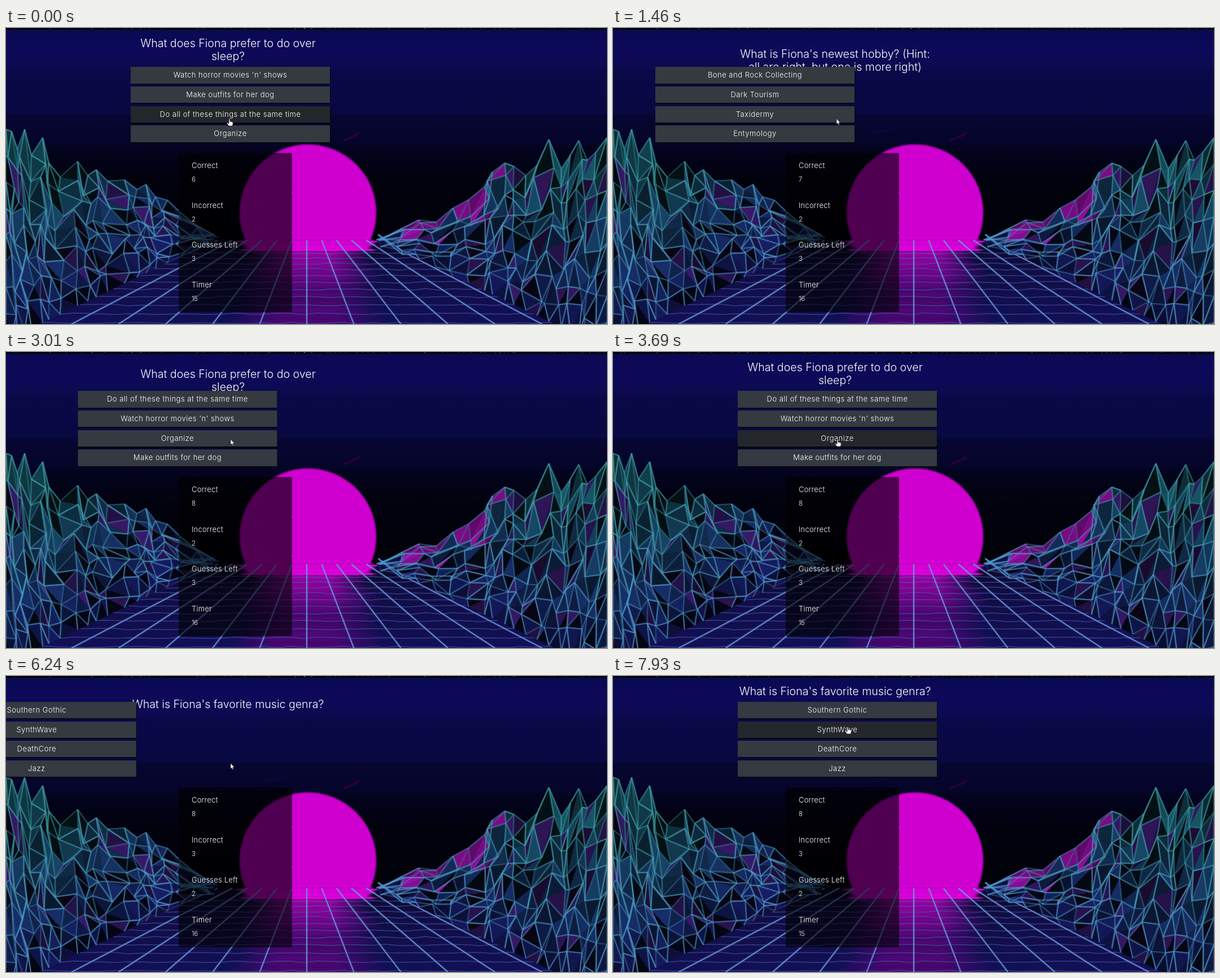
These frames come from a looping animation (1065 by 526 pixels, 8 s). An HTML page with a canvas:

```html
<!DOCTYPE html>
<html lang="en">
<head>
<meta charset="utf-8">
<title>Quiz</title>
<style>
  html, body { margin: 0; width: 100%; height: 100%; overflow: hidden; background: #000; }
  body { position: relative; color: #fff; font: 300 13px Inter, "Open Sans", sans-serif; white-space: nowrap; }
  canvas, #title, #options, #panel, svg { position: absolute; left: 0; top: 0; }
  #title { left: 193.5px; top: 15.5px; width: 400px; text-align: center; font-size: 19.6px; line-height: 23.5px; }
  #options { left: 221px; width: 353px; }
  #options div {
    position: absolute; width: 100%; height: 29.3px; line-height: 29.3px; text-align: center;
    letter-spacing: .5px; background: #343a40; box-shadow: 1px 1.5px 0 #05060a;
  }
  #options div.hover { background: #23272b; }
  #panel { left: 306px; width: 201px; }
  #panel div { height: 70.9px; position: relative; background: rgba(0, 0, 0, .61); border-radius: 3px; }
  #panel b, #panel span { position: absolute; left: 23px; line-height: 20px; letter-spacing: .2px; }
  #panel b { top: 12px; font-weight: 300; }
  #panel span { top: 37px; font-size: 11.5px; letter-spacing: -.3px; }
  svg { overflow: visible; width: 12px; height: 16px; }
</style>
</head>
<body>
<canvas id="view" width="1065" height="526"></canvas>
<div id="title"></div>
<div id="options"><div></div><div></div><div></div><div></div></div>
<div id="panel">
  <div><b>Correct</b><span></span></div>
  <div><b>Incorrect</b><span></span></div>
  <div><b>Guesses Left</b><span></span></div>
  <div><b>Timer</b><span></span></div>
</div>
<svg id="pointer" fill="#fff" stroke="#111" stroke-width=".7" stroke-linejoin="round">
  <path id="arrow" d="M0 0V10L2.2 8L3.8 11.5L5.3 10.8L3.8 7.4H6.8Z"/>
  <path id="hand" d="M-1 1Q0-.6 1 1V5L5 6Q6.4 6.4 6.3 8L5.4 13H-1.2L-4.5 8.6Q-4.6 6.8-3 7.4L-1 9Z"/>
</svg>
<script>
const $ = id => document.getElementById(id);

// ---------- scenery ----------
const g = $('view').getContext('2d');
let seed = 11;
const rnd = () => (seed = (seed * 16807) % 2147483647) / 2147483647;
const rgb = (c, k = 1, a = 1) => `rgba(${c.map(v => Math.round(v * k))},${a})`;
const mix = (a, b, k) => a.map((v, i) => v + (b[i] - v) * k);

function gradient(x1, y1, x2, y2, stops) {
  const fill = g.createLinearGradient(x1, y1, x2, y2);
  stops.forEach(([at, color]) => fill.addColorStop(at, color));
  return fill;
}

function line(points, color, width) {
  g.beginPath();
  points.forEach(([x, y]) => g.lineTo(x, y));
  g.strokeStyle = color;
  g.lineWidth = width;
  g.stroke();
}

function sky() {
  g.fillStyle = gradient(0, 0, 0, 378, [[0, '#090952'], [.1, '#0d0a5a'], [.19, '#0c0a50'], [.2, '#0a0948'],
    [.4, '#080842'], [.41, '#060632'], [.54, '#05052a'], [.56, '#03031f'], [.7, '#02020f'], [1, '#010108']]);
  g.fillRect(0, 0, 1065, 378);
  line([[598, 200], [612, 194], [627, 186]], 'rgba(70,0,60,.5)', 4);
  line([[460, 187], [492, 180]], 'rgba(50,0,70,.3)', 4);
}

function sun() {
  g.save();
  g.beginPath();
  g.rect(0, 0, 1065, 378);
  g.clip();
  g.beginPath();
  g.arc(535, 328, 121, 0, 7);
  g.fillStyle = '#cf00cf';
  g.strokeStyle = 'rgba(120,0,130,.6)';
  g.lineWidth = 3;
  g.fill();
  g.stroke();
  g.restore();
}

function ground() {
  g.fillStyle = gradient(0, 376, 0, 526, [[0, '#0b0722'], [.3, '#110d42'], [1, '#121055']]);
  g.fillRect(0, 376, 1065, 150);
  for (let y = 372; y < 526; y += 3) {
    const k = (y - 372) / 154;
    const half = (k < .17 ? 122 : 105 + 30 * k) + 24 * (rnd() - .5);
    const c = k < .15 ? [232, 0, 232] : mix([195, 0, 200], [88, 6, 125], Math.min(1, (k - .15) * 2.2));
    const edge = rgb(c, 1, 0), core = rgb(c, .85 + .15 * rnd(), k < .15 ? 1 : .85);
    g.fillStyle = gradient(535 - half, 0, 535 + half, 0,
      [[0, edge], [k < .15 ? .05 : .32, core], [k < .15 ? .95 : .68, core], [1, edge]]);
    g.fillRect(535 - half, y, 2 * half, 3);
  }
  for (let y = 400, step = 9; y < 526; y += step, step *= 1.07) {
    const row = [];
    for (let x = 0; x <= 1065; x += 24) row.push([x, y + 3 * (rnd() - .5)]);
    line(row, 'rgba(72,92,180,.6)', 1.5);
  }
  for (let k = -14; k <= 14; k++) {
    const at = y => [533 + k * 26 * (y - 308) / 68, y];
    line([at(377), at(526)], 'rgba(90,120,205,.3)', 4);
    line([at(377), at(526)], 'rgba(115,160,220,.85)', 1.7);
  }
}

// Wireframe slope hanging from a ridge; the ridge runs from the screen edge to the middle.
function mountains(ridge, pink) {
  const rows = 8, inner = ridge[ridge.length - 1][0];
  const mesh = ridge.map(([x, top]) => {
    const base = 378 + .48 * Math.abs(inner - x);
    return Array.from({ length: rows + 1 }, (_, j) => {
      const k = j / rows, loose = j && j < rows && x > 0 && x < 1065 ? 1 : 0;
      return [x + loose * 20 * (rnd() - .5), top + (base - top) * k + loose * 24 * (rnd() - .5)];
    });
  });
  const edges = [];
  for (let i = 0; i + 1 < mesh.length; i++) for (let j = 0; j < rows; j++) {
    const [a, b, c, d] = [mesh[i][j], mesh[i + 1][j], mesh[i + 1][j + 1], mesh[i][j + 1]];
    const far = Math.abs(inner - a[0]) / 380, teal = Math.min(1, far * 1.3) * (1 - j / rows);
    for (const tri of [[a, b, c], [a, c, d]]) {
      let color = mix([21, 20, 98], [22, 82, 98], teal);
      if (rnd() < .15) color = [52, 24, 100];
      if (pink && far < .58 && j < 4 && rnd() < .45) color = [150, 15, 165];
      g.beginPath();
      tri.forEach(p => g.lineTo(...p));
      g.fillStyle = rgb(color, rnd() < .2 ? .2 : .45 + .6 * rnd());
      g.fill();
    }
    edges.push([[a, b], teal], [[a, d], teal]);
    if (rnd() < .6) edges.push([[a, c], teal]);
  }
  for (const [pair, teal] of edges) {
    const color = mix([82, 150, 205], [62, 158, 165], teal), a = .3 + .55 * rnd();
    line(pair, rgb(color, 1, a * .35), 3.5);
    line(pair, rgb(color, 1, a), 1.5);
  }
}

sky();
sun();
ground();
mountains([[0, 180], [10, 184], [20, 215], [33, 180], [45, 226], [65, 195], [76, 240], [96, 265], [127, 237],
  [145, 262], [160, 252], [180, 272], [210, 270], [232, 287], [248, 278], [265, 300], [286, 306], [308, 327],
  [335, 350], [368, 376]], false);
mountains([[1065, 195], [1045, 221], [1030, 235], [1015, 200], [1000, 226], [984, 250], [962, 198], [941, 244],
  [921, 262], [900, 246], [884, 240], [862, 256], [848, 282], [820, 305], [792, 320], [762, 345], [732, 341],
  [702, 356], [664, 377]], true);
g.fillStyle = '#000';
g.fillRect(0, 0, 1065, 3);
for (let i = 0; i < 110; i++) {
  g.fillStyle = `rgba(200,200,200,${.2 + .5 * rnd()})`;
  g.fillRect(Math.floor(rnd() * 1065), Math.floor(rnd() * 2), 1, 1);
}

// ---------- quiz ----------
const sleep = ['What does Fiona prefer to do over', 'sleep?'];
const all = 'Do all of these things at the same time', watch = "Watch horror movies 'n' shows";
const outfits = 'Make outfits for her dog', organize = 'Organize';
const scenes = [
  { start: -1000, title: sleep, options: [watch, outfits, all, organize], score: [6, 2, 3] },
  { start: 1137, title: ["What is Fiona's newest hobby? (Hint:", 'all are right, but one is more right)'],
    options: ['Bone and Rock Collecting', 'Dark Tourism', 'Taxidermy', 'Entymology'], score: [7, 2, 3] },
  { start: 2592, title: sleep, options: [all, watch, organize, outfits], score: [8, 2, 3] },
  { start: 6195, title: ["What is Fiona's favorite music genra?"],
    options: ['Southern Gothic', 'SynthWave', 'DeathCore', 'Jazz'], score: [8, 3, 2] }
];
const timer = [[0, 15], [1030, 14], [1180, 16], [2180, 15], [2610, 16], [3570, 15], [4680, 14], [5680, 13],
  [6240, 16], [7200, 15]];
// time, x, y, hovered option
const moves = [[0, 396, 161, 2], [1180, 396, 161, -1], [2460, 398, 155, 2], [2610, 398, 155, -1],
  [3690, 398, 155, 2], [6240, 398, 155, -1], [7630, 404, 123, 2], [7780, 410, 96, 1], [7930, 416, 90, 1]];
// The screen refreshes only at these times.
const ticks = [0, 1030, 1180, 1310, 1460, 1610, 1760, 1880, 2030, 2180, 2460, 2610, 2740, 2860, 3010, 3140, 3290,
  3420, 3570, 3690, 4680, 5680, 6240, 6390, 6510, 6630, 6780, 6920, 7050, 7200, 7630, 7780, 7930];
const SLIDE = 950;

// cubic-bezier(.25, .1, .25, 1)
function ease(p) {
  if (p >= 1) return 1;
  const curve = (u, a, b) => 3 * u * (1 - u) ** 2 * a + 3 * u * u * (1 - u) * b + u ** 3;
  let lo = 0, hi = 1;
  for (let i = 0; i < 20; i++) {
    const mid = (lo + hi) / 2;
    if (curve(mid, .25, .25) < p) lo = mid; else hi = mid;
  }
  return curve(lo, .1, 1);
}

const latest = (list, t, key) => list.filter(item => item[key] <= t).pop();
const buttons = [...$('options').children];
const values = [...document.querySelectorAll('#panel span')];
let shown = -1;

function render(t) {
  const scene = latest(scenes, t, 'start');
  const left = 1 - ease((t - scene.start) / SLIDE);
  const height = 23.5 * scene.title.length;
  const [, x, y, hover] = latest(moves, t, 0);

  $('title').innerHTML = scene.title.join('<br>');
  $('title').style.transform = `translateY(${left * height}px)`;
  $('options').style.top = 22.4 + height + 'px';
  $('options').style.transform = `translateX(${-354 * left}px)`;
  buttons.forEach((b, i) => {
    b.textContent = scene.options[i];
    b.style.top = i * 34.65 + 'px';
    b.className = i === hover ? 'hover' : '';
  });
  $('panel').style.top = 174.7 + height + 'px';
  [...scene.score, latest(timer, t, 0)[1]].forEach((n, i) => values[i].textContent = n);
  $('pointer').style.transform = `translate(${x}px, ${y}px)`;
  $('arrow').style.display = hover < 0 ? '' : 'none';
  $('hand').style.display = hover < 0 ? 'none' : '';
}

const origin = performance.now();
function loop() {
  const now = (performance.now() - origin) % 8000;
  const t = ticks.filter(k => k <= now).pop();
  if (t !== shown) render(shown = t);
  requestAnimationFrame(loop);
}
loop();
</script>
</body>
</html>
```
